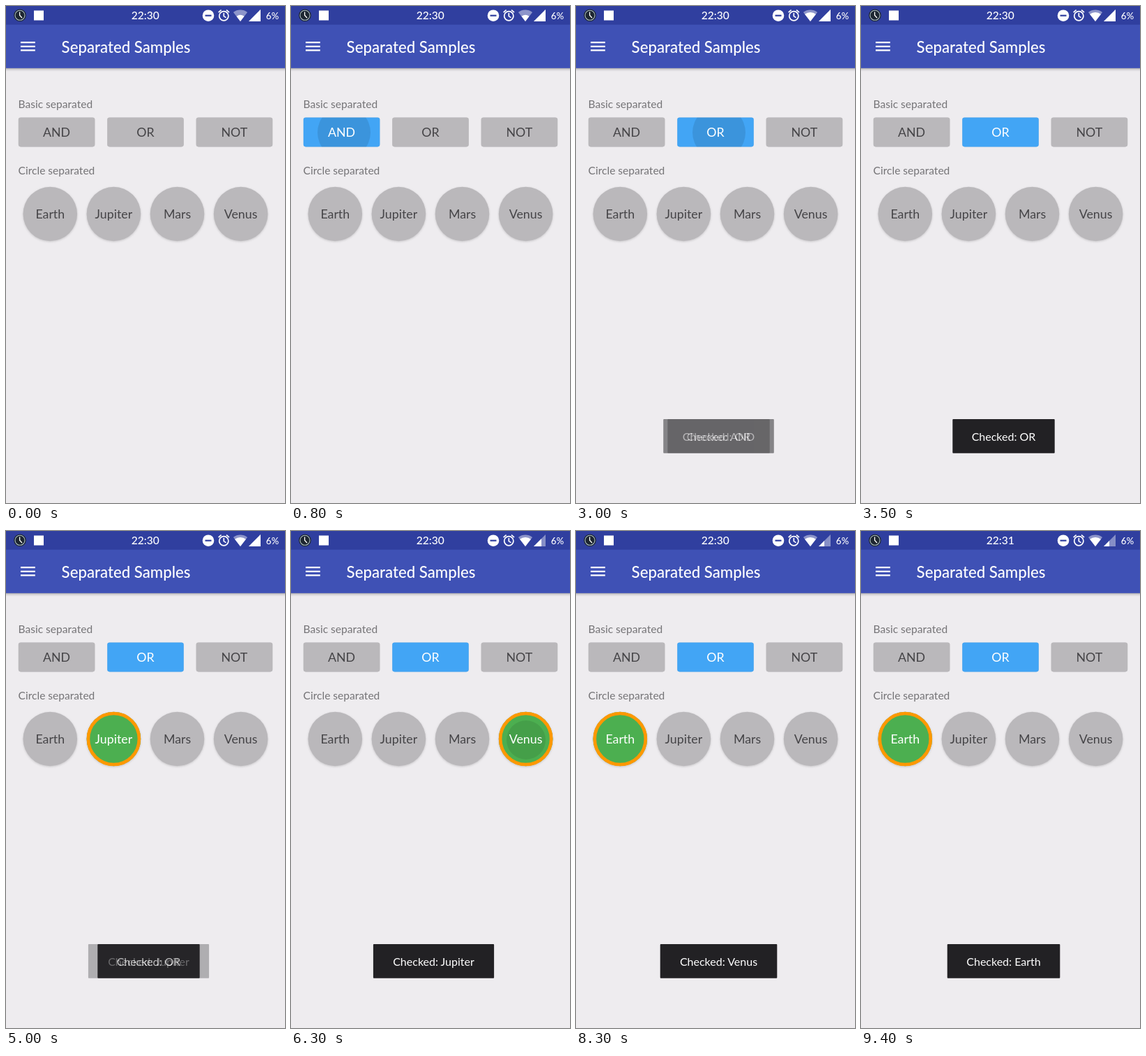
An HTML page for the animation above (9.6 s loop, 400 px wide and 711 px high).

```html
<!DOCTYPE html>
<html lang="en">
<head>
<meta charset="utf-8">
<title>Separated Samples</title>
<style>
  html, body { margin: 0; width: 100%; height: 100%; overflow: hidden; background: #eeecef; }
  svg { display: block; width: 100%; height: 100%; font-family: Lato, Carlito, sans-serif; }
  .label { font-size: 15.56px; fill: #757477; }
  .item text { font-size: 17.78px; text-anchor: middle; fill: #454447; }
  .item .face { fill: #bab8bb; }
  .item.on text { fill: #fff; }
  .rect.on .face { fill: #42a5f5; }
  .round.on .face { fill: #4caf50; }
  .ring { fill: none; stroke: #ff9800; stroke-width: 4.6; visibility: hidden; }
  .on .ring { visibility: visible; }
  .rect { filter: drop-shadow(0 .5px .5px rgba(0,0,0,.12)); }
  .round { filter: drop-shadow(0 1.5px 1.5px rgba(0,0,0,.17)); }
  .toast text { font-size: 16px; text-anchor: middle; fill: #fff; }
  .toast rect { fill: #222124; }
</style>
</head>
<body>
<svg id="stage" viewBox="0 0 400 711" preserveAspectRatio="none">
  <defs>
    <linearGradient id="shade" x2="0" y2="1">
      <stop offset="0" stop-color="#000" stop-opacity=".3"/>
      <stop offset=".4" stop-color="#000" stop-opacity=".1"/>
      <stop offset="1" stop-color="#000" stop-opacity="0"/>
    </linearGradient>
  </defs>
  <rect width="400" height="711" fill="#eeecef"/>
  <rect y="88.9" width="400" height="5" fill="url(#shade)"/>
  <rect y="26" width="400" height="62.9" fill="#3f51b5"/>
  <rect width="400" height="26.7" fill="#303f9f"/>

  <g id="status" fill="#fff">
    <circle cx="20" cy="13.3" r="8.8" fill="#1d2630"/>
    <circle cx="20" cy="13.3" r="7" fill="none" stroke="#a9bcc4" stroke-width="1.1"/>
    <path d="M19.6 8.5V13.3L23 17" fill="none" stroke="#fff" stroke-width="1.3"/>
    <rect x="40" y="6.5" width="14" height="14"/>
    <text id="clock" x="199.8" y="19.4" font-size="15.56" font-weight="500" text-anchor="middle"></text>
    <circle cx="290" cy="13.7" r="8.3"/>
    <rect x="285.5" y="12.6" width="9" height="2.2" fill="#303f9f"/>
    <g fill="none" stroke="#fff" stroke-width="1.7">
      <circle cx="312.3" cy="14.2" r="6.6"/>
      <path d="M312.3 10V14.6L315.5 16.6M304.6 9.1L308.6 5.7M320 9.1L316 5.7"/>
    </g>
    <path id="wifiBack" opacity=".45"/>
    <path id="wifi"/>
    <path d="M348 22H365V5Z" opacity=".42"/>
    <path id="signal"/>
    <text x="372.8" y="18.6" font-size="13.33" font-weight="500">6%</text>
  </g>

  <path d="M21 52.2H41.8M21 57.8H41.8M21 63.4H41.8" stroke="#fff" stroke-width="2.2"/>
  <text x="79.6" y="66.6" font-size="22.22" font-weight="500" fill="#fff">Separated Samples</text>
  <text class="label" x="17.6" y="146">Basic separated</text>
  <text class="label" x="17.6" y="241">Circle separated</text>
</svg>
<script>
const LOOP = 9600, STEP = 100, FADE = 500;
const stage = document.getElementById('stage');
const byId = id => document.getElementById(id);

function add(parent, tag, attrs, text) {
  const el = document.createElementNS('http://www.w3.org/2000/svg', tag);
  for (const key in attrs) el.setAttribute(key, attrs[key]);
  if (text) el.textContent = text;
  return parent.appendChild(el);
}

// Each item is checked from "on" to "off"; "tap" is the ripple's centre and first radius.
const items = [
  { name: 'AND', on: 600, off: 2800, tap: [76, 181, 22] },
  { name: 'OR', on: 2800, off: LOOP, tap: [205, 181, 22] },
  { name: 'NOT' },
  { name: 'Earth', on: 7900, off: LOOP, tap: [63, 299, 28] },
  { name: 'Jupiter', on: 4500, off: 6300, tap: [154, 299, 28] },
  { name: 'Mars' },
  { name: 'Venus', on: 6300, off: 7900, tap: [337, 299, 28] }
];
const RIPPLE = [.09, .1, .1, .05];

items.forEach((item, i) => {
  const round = i > 2;
  const cx = round ? 63.3 + (i - 3) * 91.1 : 72.6 + i * 127.4;
  const shape = round
    ? ['circle', { cx, cy: 297.5, r: 38.8 }]
    : ['rect', { x: cx - 54.8, y: 159.4, width: 109.6, height: 42, rx: 3.3 }];
  const g = item.el = add(stage, 'g', {});
  item.kind = round ? 'item round' : 'item rect';
  add(g, shape[0], { ...shape[1], class: 'face' });
  if (item.tap) {
    add(add(g, 'clipPath', { id: 'clip' + i }), ...shape);
    item.ripple = add(g, 'circle', { cx: item.tap[0], cy: item.tap[1], 'clip-path': `url(#clip${i})` });
  }
  if (round) add(g, 'circle', { cx, cy: 297.5, r: 36.5, class: 'ring' });
  add(g, 'text', { x: cx, y: round ? 304 : 187.2 }, item.name);
});

// Name, box width, start of the fade in, start of the fade out.
const toasts = [
  ['AND', 158.6, 1018, 2650],
  ['OR', 146.4, 2918, 4900],
  ['Jupiter', 173.2, 4918, 6940],
  ['Venus', 167.6, 6940, 8840],
  ['Earth', 161.6, 8840, LOOP]
].map(([name, width, show, hide]) => {
  const el = add(stage, 'g', { class: 'toast' });
  add(el, 'rect', { x: 204.5 - width / 2, y: 591, width, height: 48.8, rx: 1 });
  add(el, 'text', { x: 204.5, y: 622.3 }, 'Checked: ' + name);
  return { el, show, hide };
});

const fan = r => {
  const x = r * .61, y = 22 - r * .792;
  return `M336 22L${336 - x} ${y}A${r} ${r} 0 0 1 ${336 + x} ${y}Z`;
};
const wedge = x => `M348 22H${x}V${370 - x}Z`;
const progress = (t, start) => Math.min(1, Math.max(0, (t - start) / FADE));

byId('wifiBack').setAttribute('d', fan(16.5));

function draw(t) {
  for (const { el, kind, on, off, tap, ripple } of items) {
    el.setAttribute('class', kind + (t >= on && t < off ? ' on' : ''));
    if (!ripple) continue;
    const k = (t - on) / STEP;
    ripple.setAttribute('opacity', RIPPLE[k] || 0);
    ripple.setAttribute('r', tap[2] + 8 * Math.max(0, k));
  }
  for (const { el, show, hide } of toasts) {
    const enter = 1 - (1 - progress(t, show)) ** 2;
    const leave = 1 - progress(t, hide) ** 2;
    el.setAttribute('opacity', enter * leave);
  }
  byId('clock').textContent = t < 9100 ? '22:30' : '22:31';
  byId('wifi').setAttribute('d', fan(t < 1700 ? 9 : 13));
  byId('signal').setAttribute('d', wedge(t < 5800 ? 365 : t < 6500 ? 359 : 356));
}

const start = performance.now();
function tick() {
  const t = (performance.now() - start) % LOOP;
  draw(Math.floor(t / STEP) * STEP);
  requestAnimationFrame(tick);
}
tick();
</script>
</body>
</html>
```
